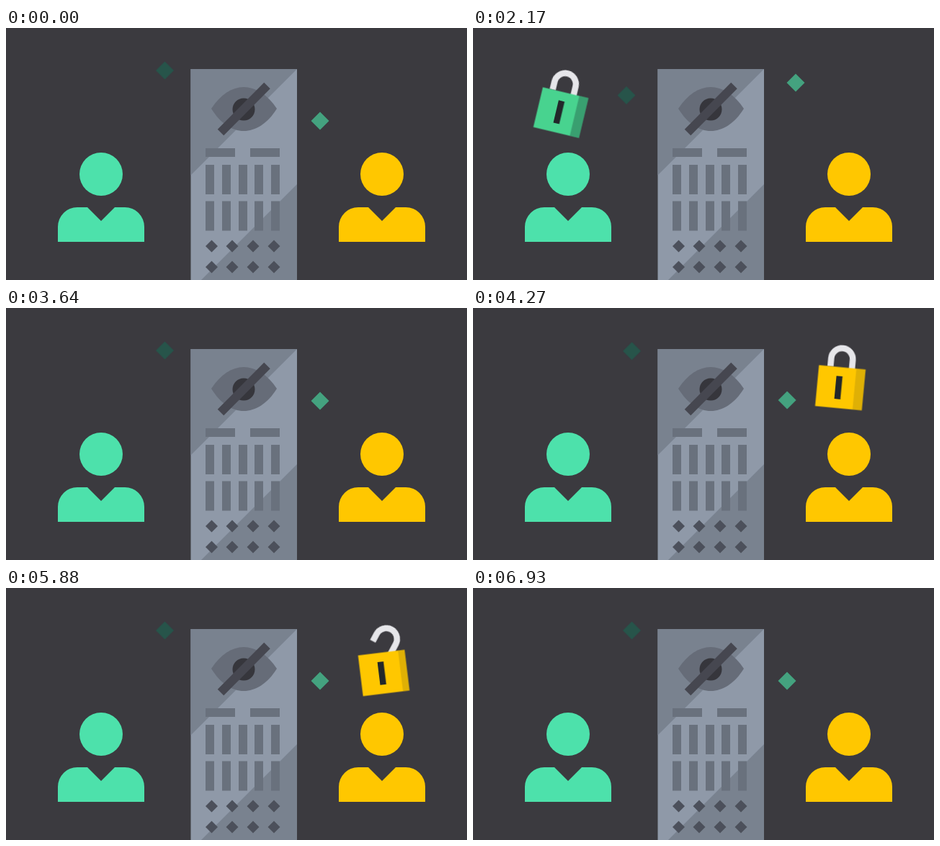
An HTML page that plays this animation: 640 px wide and 350 px high, repeating every 7000 ms.

```html
<!DOCTYPE html>
<html lang="en">
<head>
<meta charset="utf-8">
<title>Lock passing a wall</title>
<style>
  html, body { margin: 0; width: 100%; height: 100%; overflow: hidden; background: #3b3a3f; }
  svg { display: block; width: 100%; height: 100%; }
  .lock, .shackle, .side, .gem { animation: 7s ease-in-out infinite; }
  .lock { animation-name: travel; }
  .shackle { animation-name: latch; transform-origin: 11.5px -28px; }
  .side { animation-name: turn; transform-origin: 32.5px 0; }
  .gem.dim { animation-name: driftDim; }
  .gem.lit { animation-name: driftLit; }

  @keyframes travel {
    0%, 3% { transform: translate(125.5px, 118.5px) rotate(0deg) scale(0); fill: #48d38f; }
    8% { transform: translate(125.5px, 118.5px) rotate(0deg) scale(1.08); }
    10%, 14.5% { transform: translate(125.5px, 118.5px) rotate(0deg) scale(1); }
    17% { transform: translate(125.5px, 110px) rotate(0deg) scale(1); }
    20%, 23% { transform: translate(125.5px, 118.5px) rotate(0deg) scale(1); }
    30%, 33.5% { transform: translate(122px, 117.5px) rotate(13.4deg) scale(1); }
    43% { transform: translate(330px, 118px) rotate(0deg) scale(1); fill: #48d38f; }
    44%, 54% { transform: translate(330px, 118px) rotate(0deg) scale(1); fill: #ffc700; }
    63% { transform: translate(530px, 110px) rotate(6deg) scale(1); }
    68%, 87.5% { transform: translate(524.5px, 118px) rotate(-7deg) scale(1); }
    89% { transform: translate(524.5px, 118px) rotate(-7deg) scale(1.06); }
    94%, 100% { transform: translate(524.5px, 118px) rotate(-7deg) scale(0); fill: #ffc700; }
  }
  @keyframes latch {
    0%, 16% { transform: rotate(28deg); }
    20%, 43% { transform: rotate(0deg); }
    44%, 69% { transform: translateX(2px) rotate(0deg); }
    72% { transform: translateX(2px) rotate(12deg); }
    75% { transform: translateX(3px) rotate(40deg); }
    78%, 100% { transform: translateX(3px) rotate(35deg); }
  }
  @keyframes turn {
    0%, 23% { transform: scaleX(.54); opacity: .28; }
    30%, 43% { transform: scaleX(1); opacity: .28; }
    44%, 60% { transform: scaleX(1); opacity: .14; }
    68%, 100% { transform: scaleX(.7); opacity: .14; }
  }
  @keyframes driftDim {
    0%, 23% { transform: translate(220.5px, 59px); }
    31%, 41% { transform: translate(213px, 93.5px); }
    50%, 60% { transform: translate(220.5px, 59px); }
    70%, 74% { transform: translate(222.5px, 96px); }
    82%, 100% { transform: translate(220.5px, 59px); }
  }
  @keyframes driftLit {
    0%, 23% { transform: translate(436px, 129px); }
    31%, 41% { transform: translate(448px, 76px); }
    50%, 60% { transform: translate(436px, 129px); }
    70%, 74% { transform: translate(441px, 77px); }
    82%, 100% { transform: translate(436px, 129px); }
  }
</style>
</head>
<body>
<svg viewBox="0 0 640 350">
  <defs>
    <g id="person">
      <circle cx="132" cy="203" r="30"/>
      <path d="M72 297V276A27 27 0 0 1 99 249H113L132 268L151 249H165A27 27 0 0 1 192 276V297Z"/>
    </g>
    <path id="row" d="M277 0h12v41h-12zM300 0h12v41h-12zM323 0h12v41h-12zM345 0h12v41h-12zM368 0h12v41h-12z"/>
    <path id="stud" d="M0-8.5L8.5 0L0 8.5L-8.5 0Z"/>
    <g id="studs">
      <use href="#stud" x="285.5"/>
      <use href="#stud" x="314"/>
      <use href="#stud" x="343"/>
      <use href="#stud" x="372"/>
    </g>
    <path id="gem" d="M0-12.5L12.5 0L0 12.5L-12.5 0Z"/>
  </defs>

  <rect width="640" height="350" fill="#3b3a3f"/>
  <use href="#person" fill="#4de1ab"/>
  <use href="#person" x="390" fill="#ffc700"/>

  <g class="lock">
    <path class="shackle" d="M11.5-22V-40A15 15 0 0 0-18.5-40V-28.5" fill="none" stroke="#e6e6ea" stroke-width="8.5"/>
    <rect x="-32.5" y="-28.5" width="65" height="57"/>
    <rect class="side" x="19.5" y="-28.5" width="13" height="57" fill="#101820"/>
    <rect x="-7" y="-16" width="8.5" height="32" fill="#22272a"/>
  </g>

  <g class="gem dim"><use href="#gem" fill="#27544a"/></g>
  <g class="gem lit"><use href="#gem" fill="#44a27f"/></g>

  <g>
    <path d="M256.500 57H404V350H256.500Z" fill="#8f99a8"/>
    <path d="M256.500 57H404L256.500 204.500ZM404 217V350H271Z" fill="#79828f"/>
    <path d="M285 112C298 92 314 82 330 82S363 92 376 112C363 133 346 143 330 143S298 133 285 112Z" fill="#666c78"/>
    <circle cx="330" cy="113" r="15.500" fill="#36363c"/>
    <path d="M298 145L362.500 80" stroke="#464750" stroke-width="12"/>
    <g fill="#69717d">
      <path d="M277 167h41v12h-41zM339 167h41v12h-41z"/>
      <use href="#row" y="190"/>
      <use href="#row" y="240.500"/>
    </g>
    <g fill="#4c505b">
      <use href="#studs" y="303"/>
      <use href="#studs" y="332"/>
    </g>
  </g>
</svg>
</body>
</html>
```
